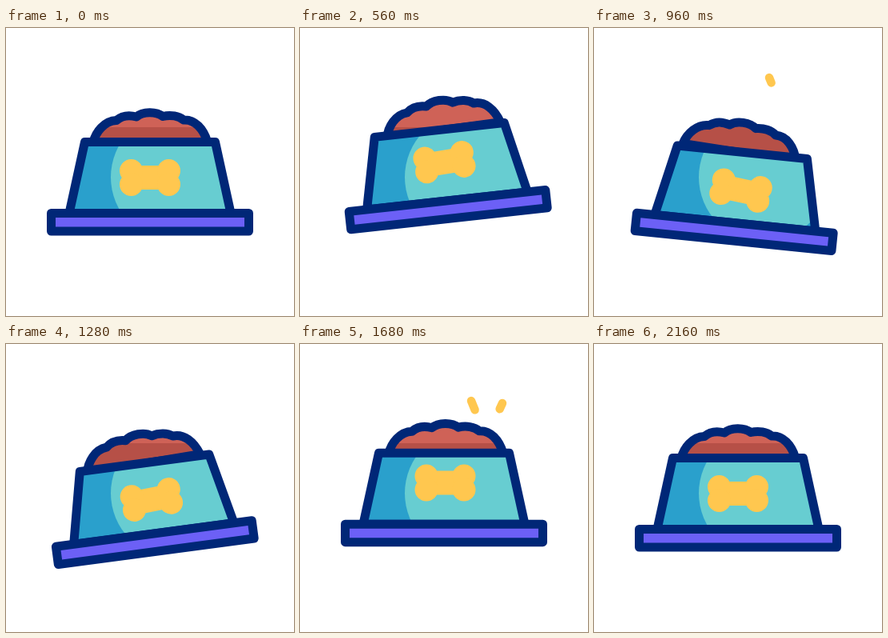
These frames come from a looping animation (360 by 360 pixels, 2400 ms). An HTML page:

```html
<!DOCTYPE html>
<html lang="en">
<head>
<meta charset="utf-8">
<title>Pet bowl</title>
<style>
  html, body { margin: 0; width: 100%; height: 100%; overflow: hidden; background: #fff; }
  svg { display: block; width: 100%; height: 100%; }
  .line { fill: none; stroke: #002777; stroke-width: 11; stroke-linejoin: round; }
  #dashes { stroke: #ffc74f; stroke-width: 10.5; stroke-linecap: round; }
</style>
</head>
<body>
<svg viewBox="0 0 360 360">
  <defs>
    <path id="foodShape" d="M109 143C112 130 123 116 138 115.5C145 109.5 154 108.5 163 111C171 104 188 104 196 110.5C206 108 216 110 222 115C236 114 247 126 252 143Z"/>
    <path id="bodyShape" d="M98.5 142.5H261.5L281 231.5H79Z"/>
    <clipPath id="foodClip"><use href="#foodShape" class="food"/></clipPath>
    <clipPath id="bodyClip"><use href="#bodyShape" class="bowl"/></clipPath>
  </defs>
  <!-- Shading stays still while the food and bowl move over it. -->
  <g clip-path="url(#foodClip)">
    <rect width="360" height="360" fill="#cf6257"/>
    <rect y="124" width="360" height="236" fill="#b65047"/>
  </g>
  <use href="#foodShape" class="food line"/>
  <g clip-path="url(#bodyClip)">
    <rect width="360" height="360" fill="#2aa0cc"/>
    <circle cx="212" cy="186.5" r="81" fill="#67cdd1"/>
  </g>
  <g class="bowl">
    <use href="#bodyShape" class="line"/>
    <rect x="56.5" y="231.5" width="247" height="22.5" fill="#6c60f6"/>
    <rect x="56.5" y="231.5" width="247" height="22.5" class="line"/>
  </g>
  <g id="bone" fill="#ffc74f">
    <rect x="-24" y="-15" width="48" height="30"/>
    <circle cx="-23.5" cy="-8.5" r="14.5"/>
    <circle cx="-23.5" cy="8.5" r="14.5"/>
    <circle cx="23.5" cy="-8.5" r="14.5"/>
    <circle cx="23.5" cy="8.5" r="14.5"/>
  </g>
  <g id="dashes"></g>
</svg>
<script>
const LOOP = 2400, DASH = 24;
const clamp = v => Math.max(0, Math.min(1, v));

// Swings between [time, value] turning points with ease-in-out.
function swing(t, ...points) {
  let value = points[0][1];
  for (let i = 1; i < points.length; i++) {
    const [t0, v0] = points[i - 1], [t1, v1] = points[i];
    const p = clamp((t - t0) / (t1 - t0));
    value += (v1 - v0) * p * p * (3 - 2 * p);
  }
  return value;
}

const motion = {
  tilt: t => swing(t, [0, 0], [400, -9.3], [960, 5.8], [1340, -8.5], [1680, 0]),
  lift: t => swing(t, [0, 0], [540, -15.5], [1000, 13], [1680, -6.3], [2160, 0]),
  boneTilt: t => swing(t, [0, 0], [400, -14], [980, 12], [1340, -13], [1680, 0]),
  boneLift: t => swing(t, [0, 0], [520, -20], [1030, 18], [1680, -13.5], [2160, 0]),
  boneDrift: t => swing(t, [0, 0], [1200, 3], [2160, 0]),
  foodSlide: t => swing(t, [0, 0], [600, 5], [980, -4], [1680, 2], [2160, 0])
};

const bursts = [
  { start: 620, x: 0, y: 0 },
  { start: 1440, x: -5, y: 9 }
];
// Outer end of each dash and its direction.
const rays = [
  { x: 219, y: 62, angle: -22 },
  { x: 258, y: 65, angle: 25 },
  { x: 287, y: 92, angle: 70 }
];

const dashes = bursts.flatMap(burst => rays.map((ray, i) => {
  const line = document.createElementNS('http://www.w3.org/2000/svg', 'line');
  line.setAttribute('transform',
    `translate(${ray.x + burst.x} ${ray.y + burst.y}) rotate(${ray.angle})`);
  document.getElementById('dashes').append(line);
  return { line, start: burst.start, fade: 450 - 120 * i };
}));

function drawDash({ line, start, fade }, t) {
  const head = clamp((t - start) / 160);
  const tail = clamp((t - start - 20) / fade);
  line.style.display = head - tail > 0.04 ? '' : 'none';
  line.setAttribute('y1', DASH * (1 - tail));
  line.setAttribute('y2', DASH * (1 - head));
}

function place(selector, transform) {
  document.querySelectorAll(selector).forEach(el => el.setAttribute('transform', transform));
}

function draw(t) {
  const pose = {};
  for (const key in motion) pose[key] = motion[key](t);
  const { tilt, lift, boneTilt, boneLift, boneDrift, foodSlide } = pose;
  const bowl = `translate(0 ${lift}) rotate(${tilt} 180 195)`;
  place('.bowl', bowl);
  place('.food', `${bowl} translate(${foodSlide} 0) rotate(${(boneTilt - tilt) / 2} 180 143)`);
  place('#bone', `translate(${180 + boneDrift + 0.14 * tilt} ${187 + boneLift}) rotate(${boneTilt})`);
  dashes.forEach(dash => drawDash(dash, t));
}

const start = performance.now();
function tick() {
  draw((performance.now() - start) % LOOP);
  requestAnimationFrame(tick);
}
tick();
</script>
</body>
</html>
```
